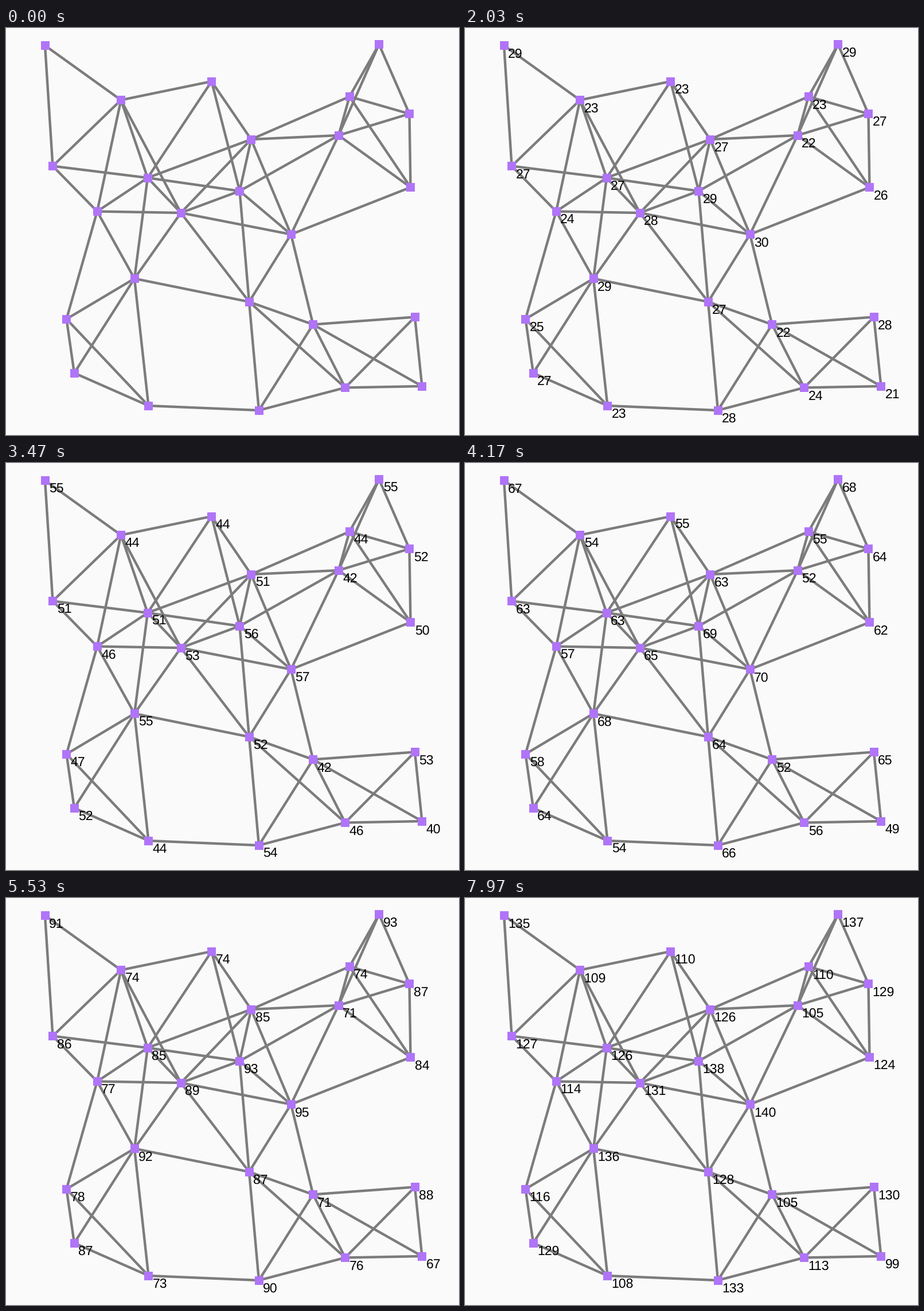
Animation, 790 px wide and 709 px high, one loop 8 s. Source, as a matplotlib script:

```python
from itertools import combinations
from math import dist

import matplotlib.pyplot as plt
from matplotlib.animation import FuncAnimation
from matplotlib.collections import LineCollection, PatchCollection
from matplotlib.patches import Rectangle

W, H, DPI = 790, 709, 64
PT = 72 / DPI            # points per pixel
LOOP, STEP = 8000, 32    # ms
START, END = 450, 7970   # counting period, ms
REACH = 225              # nodes closer than this are linked
SIDE = 15

# x, y and final count of each node
NODES = [
    (68, 30.5, 135), (200.5, 125.5, 109), (358.5, 93, 110), (81.5, 240.5, 127),
    (247, 261, 126), (159, 319.5, 114), (305, 322, 131), (427.5, 194, 126),
    (407.5, 284, 138), (497, 359.5, 140), (224, 436.5, 136), (424, 477, 128),
    (105.5, 507, 116), (119, 601, 129), (248.5, 658, 108), (441, 666, 133),
    (535.5, 516.5, 105), (591.5, 626.5, 113), (713, 503.5, 130), (725.5, 624, 99),
    (650.5, 28.5, 137), (599, 119.5, 110), (580, 187, 105), (703.5, 149.5, 129),
    (705.5, 277.5, 124),
]
POINTS = [(x, y) for x, y, _ in NODES]

plt.rcParams["font.family"] = "Liberation Sans"
plt.rcParams["text.hinting"] = "none"
fig = plt.figure(figsize=(W / DPI, H / DPI), dpi=DPI, facecolor="#fafafb")
ax = fig.add_axes([0, 0, 1, 1])
ax.set_xlim(0, W)
ax.set_ylim(H, 0)
ax.axis("off")

links = [pair for pair in combinations(POINTS, 2) if dist(*pair) < REACH]
ax.add_collection(LineCollection(links, colors="#7c7c7c", linewidths=4.4 * PT, zorder=1))

squares = [Rectangle((x - SIDE / 2, y - SIDE / 2), SIDE, SIDE) for x, y in POINTS]
ax.add_collection(PatchCollection(squares, facecolor="#b074f8", edgecolor="none", zorder=2))

labels = [ax.text(x + 7.2, y + 21, "", size=23 * PT, color="black",
                  va="baseline", zorder=3) for x, y in POINTS]


def draw(i):
    t = (i + 1) * STEP - 1
    progress = min(max((t - START) / (END - START), 0), 1)
    for label, (_, _, total) in zip(labels, NODES):
        count = round(total * progress)
        label.set_text(str(count) if count else "")
    return labels


anim = FuncAnimation(fig, draw, frames=LOOP // STEP, interval=STEP,
                     init_func=lambda: draw(0), repeat=True, repeat_delay=0)
plt.show()
```
